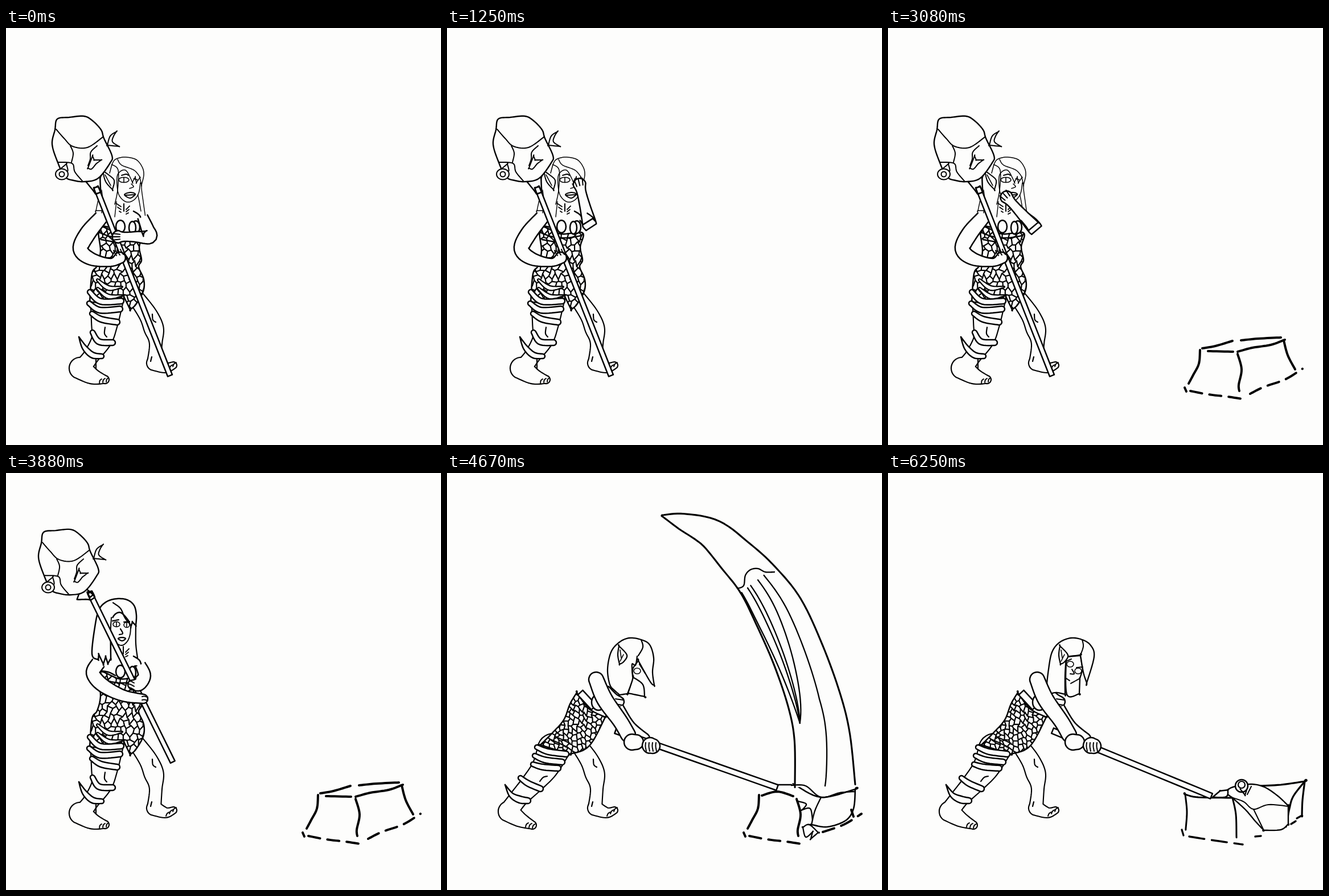
An HTML page with a canvas that plays this animation: 764 px wide and 733 px high, repeating every 6.71 s.

```html
<!DOCTYPE html>
<html lang="en">
<head>
<meta charset="utf-8">
<title>Club swing</title>
<style>
html, body { margin: 0; width: 100%; height: 100%; overflow: hidden; background: #fdfdfc; }
canvas { display: block; }
</style>
</head>
<body>
<canvas id="stage" width="764" height="733"></canvas>
<script>
const ctx = document.getElementById('stage').getContext('2d');
const PAPER = '#fdfdfc', LOOP = 6710, BODY = 2.5, THIN = 1.6;
const clamp = v => Math.max(0, Math.min(1, v));
const span = (t, a, b) => clamp((t - a) / (b - a));
const ease = u => u * u * (3 - 2 * u);
const lerp = (a, b, u) => a + (b - a) * u;
const mix = (p, q, u) => p.map((v, i) => lerp(v, q[i], u));
const add = (p, q) => p.map((v, i) => v + q[i]);
const polar = ([x, y], r, a) => [x + r * Math.cos(a), y + r * Math.sin(a)];
const noise = n => { const s = Math.sin(n * 127.1) * 43758.5453; return s - Math.floor(s) - 0.5; };

// "x,y x,y": smooth line through key points; "!" marks a corner, "z" closes it.
const keysOf = text => text.split(' ').flatMap(k => {
  const point = k.split(',').map(parseFloat);
  return k.includes('!') ? [point, point] : [point];
});

function spline(keys, u, closed) {
  const n = keys.length, i = Math.min(Math.floor(u), closed ? n - 1 : n - 2), f = u - i;
  const at = k => closed ? keys[(k + n) % n] : keys[Math.max(0, Math.min(n - 1, k))];
  const [a, b, c, d] = [at(i - 1), at(i), at(i + 1), at(i + 2)];
  return b.map((v, k) => v + f * ((c[k] - a[k]) / 2
    + f * (a[k] - 2.5 * v + 2 * c[k] - d[k] / 2 + f * (1.5 * (v - c[k]) + (d[k] - a[k]) / 2))));
}

function sampled(keys, closed, from = 0, to = closed ? keys.length : keys.length - 1) {
  const steps = Math.ceil((to - from) * 8);
  return Array.from({ length: steps + 1 }, (_, i) => spline(keys, lerp(from, to, i / steps), closed));
}

function trace(points, closed) {
  const path = new Path2D();
  points.forEach(p => path.lineTo(p[0], p[1]));
  if (closed) path.closePath();
  return path;
}

const cache = new Map();
function shape(text) {
  const closed = text.endsWith('z');
  if (!cache.has(text)) cache.set(text, trace(sampled(keysOf(text), closed), closed));
  return cache.get(text);
}

function paint(width, path, fill = true) {
  if (fill) { ctx.fillStyle = PAPER; ctx.fill(path); }
  ctx.lineWidth = width;
  ctx.stroke(path);
}
const ink = (width, ...lines) => lines.forEach(l => paint(width, shape(l), false));
const solid = (width, ...lines) => lines.forEach(l => paint(width, shape(l)));

function oval(width, x, y, rx, ry = rx) {
  const path = new Path2D();
  path.ellipse(x, y, rx, ry, 0, 0, Math.PI * 2);
  paint(width, path);
}

function ribs(spine) {
  const points = sampled(spine);
  return points.map((p, i) => {
    const a = points[Math.max(0, i - 1)], b = points[Math.min(points.length - 1, i + 1)];
    return { p, r: p[2], angle: Math.atan2(b[1] - a[1], b[0] - a[0]) };
  });
}
const side = ({ p, r, angle }, f) => polar(p, r * f, angle + Math.PI / 2);

// Outline around a spine of "x,y,radius" keys. Ends: open start, round or flat.
function limb(spine, ends = 'open') {
  const bones = ribs(typeof spine === 'string' ? keysOf(spine) : spine);
  const path = new Path2D(), half = Math.PI / 2;
  const cap = ({ p, r, angle }, turn) =>
    path.arc(p[0], p[1], Math.max(r, 0.1), angle + turn - half, angle + turn + half);
  bones.forEach(b => path.lineTo(...side(b, -1)));
  if (ends !== 'flat') cap(bones[bones.length - 1], 0);
  bones.reverse().forEach(b => path.lineTo(...side(b, 1)));
  if (ends === 'round') cap(bones[bones.length - 1], Math.PI);
  if (ends !== 'open') path.closePath();
  return path;
}

// Several limbs sharing one outer line.
function fuse(width, ...limbs) {
  const paths = limbs.map(l => limb(l, 'round'));
  ctx.lineWidth = width * 1.7;
  paths.forEach(p => ctx.stroke(p));
  ctx.fillStyle = PAPER;
  paths.forEach(p => ctx.fill(p));
}

function band(x0, y0, x1, y1, sag, r = 5) {
  paint(BODY, limb([[x0, y0, r - 1], [lerp(x0, x1, 0.4) - sag / 3, lerp(y0, y1, 0.4) + sag, r], [x1, y1, r]], 'round'));
}

// Short parallel lines for toes and fingers.
function digits(x, y, dx, dy, stepX, stepY, count) {
  for (let i = 0; i < count; i++) {
    const px = x + i * stepX, py = y + i * stepY;
    ink(2, `${px},${py} ${px + dx / 2 - 1},${py + dy / 2 - 1} ${px + dx},${py + dy}`);
  }
}

// Honeycomb of shaken corners inside an outline.
function scales(outline, [x0, y0, x1, y1], step, turn = 0) {
  solid(BODY, outline);
  ctx.save();
  ctx.clip(shape(outline));
  ctx.translate((x0 + x1) / 2, (y0 + y1) / 2);
  ctx.rotate(turn);
  const cols = Math.ceil((x1 - x0) / step * 1.4), rows = Math.ceil((y1 - y0) / step * 0.8);
  const corner = (i, j) => {
    const seed = i * 17.3 + j * 5.7;
    return [i * step / 2 + noise(seed) * step * 0.5,
      j * step + ((i + j) & 1 ? step * 0.45 : 0) + noise(seed + 0.4) * step * 0.6];
  };
  const path = new Path2D();
  for (let j = -rows; j < rows; j++) {
    for (let i = -cols; i < cols; i++) {
      path.moveTo(...corner(i, j));
      path.lineTo(...corner(i + 1, j));
      if ((i + j) & 1) {
        path.moveTo(...corner(i, j));
        path.lineTo(...corner(i, j + 1));
      }
    }
  }
  paint(2.2, path, false);
  ctx.restore();
}

function frontLeg() {
  fuse(BODY, '230,476,13 250,505,15 260,530,16 263,555,10 260,588,11', '260,589,12 280,597,8 294,593,5');
  ink(2.2, '257,503 258,513 263,517', '256,578 254,586');
  digits(281, 603, 6, -7, 6, -4, 3);
}

function standingBody() {
  frontLeg();
  fuse(BODY, '177,478,28 173,520,22 168,548,17 150,576,13 138,592,14', '130,598,18 152,612,13 174,618,6');
  digits(164, 624, 4, -7, 6, -1, 3);
  ink(2.2, '174,526 173,537 177,543', '158,583 158,599');
  scales('164,350 200,362 238,360 234,385 238,408 233,420 242,442 241,463 228,486 218,495! 207,472! 200,482 147,482! 151,432 160,418 166,392z', [148, 350, 246, 496], 11);
  for (const y of [443, 458]) paint(2.2, limb([[161, y, 2], [180, y + 14, 4], [204, y + 12, 1]], 'round'));
  band(147, 464, 202, 480, 10);
  band(146, 484, 200, 494, 8);
  band(151, 502, 195, 517, 4);
  band(152, 535, 187, 553, 9);
  paint(BODY, limb('128,543,0 138,562,4 152,575,5 168,577,4', 'round'));
}

function neckMarks(x, y) {
  ink(2, `${x},${y} ${x},${y + 13}`);
  for (let i = 0; i < 3; i++) {
    ink(1.8, `${x - 14 + i * 3},${y + i * 7 - 1} ${x - 5},${y + 5 + i * 5}`,
      `${x + 4},${y + 10 + i * 4} ${x + 10 - i},${y + 4 + i * 6}`);
  }
}

function chest() {
  ink(BODY, '162,347 180,350 192,356', '163,359 185,367 210,369 236,365', '167,372 190,376', '224,322 235,330 239,345');
  oval(BODY, 201, 349, 8, 11);
  oval(BODY, 228, 350, 7, 11);
  oval(BODY, 222, 351, 6, 11);
}

function eye(x, y, rx) {
  oval(THIN, x, y, rx, 4.5);
  ink(THIN, `${x},${y - 4} ${x},${y + 4}`);
}

function standingHead() {
  ink(1.4, '170,254 164,270 164,290 158,321! 168,321', '168,285 170,305 168,325',
    '240,262 238,280 241,305 245,333! 238,335', '231,290 234,305 237,322', '194,305 191,332');
  solid(1.5, '186,240 192,231 208,227 228,231 239,244 242,258 238,276! 235,263! 229,272! 227,262! 222,271! 210,250 196,258 196,285 202,299 213,306 225,302 233,290 236,272');
  ink(1.5, '186,240 182,255', '196,231 203,241 225,250 236,263', '186,240 197,250 196,285 191,310',
    '220,274 224,279 217,282', '224,265 231,267');
  eye(207, 267, 9);
  ink(2, '203,259 211,257 215,259', '208,293 218,289 227,292 218,299z', '209,294 227,293');
  solid(2, '170,251! 175,270 187,284! 190,268 180,258z');
  ink(THIN, '174,258 184,277');
  neckMarks(207, 309);
}

function grippingHead() {
  solid(BODY, '184,326! 179,335! 175,323! 171,336! 163,319! 162,328! 151,318 157,265 164,239 177,226 195,221 213,223 225,233 229,250 228,268! 222,262! 219,271! 214,258 200,245 187,255 184,285z');
  solid(1.9, '185,254 184,285 191,297 203,303 213,296 218,283 219,268');
  ink(2.2, '188,228 201,238 208,253 215,263', '228,266 228,300 231,325', '187,260 198,258', '207,262 217,261',
    '201,274 205,282 199,284', '197,291 204,289 210,291 204,295z');
  eye(194, 266, 6);
  eye(212, 267, 5);
  neckMarks(206, 305);
}

// The head keeps its shape; the handle runs from under it to the given end.
function club(head, neck, end) {
  const joint = add(head, neck);
  paint(BODY, limb([[...add(head, [20, 54]), 13], [...joint, 5], [...mix(joint, end, 0.05), 4.3], [...end, 4.3]], 'flat'));
  ctx.save();
  ctx.translate(...head);
  solid(2.4, '-43,-52 -22,-55 4,-57 19,-49 34,-33 39,-18 53,12 50,25 29,52 6,58 -14,56 -30,49 -43,22 -52,-8 -47,-33z');
  ink(2, '-45,-34 -31,-18 -16,-4 10,-2 38,-21', '-20,-5 -15,8 -18,24', '-41,24 -17,26 -12,41 2,58', '27,-5 16,6 15,18 11,30');
  solid(2, '11,34! 19,13! 22,20! 34,20! 25,27! 17,36z', '45,-6! 50,-22 61,-30! 56,-22 54,-12 65,-4! 54,-5z', '-39,37! -27,27! -25,40z');
  oval(2, -35, 45, 11, 9.5);
  oval(2, -35, 45, 4.5);
  ctx.restore();
}

// Elbow point, then forearm length and angle in degrees.
const ARM = { crossed: [252, 367, 56, 180], face: [250, 344, 73, 256], raised: [262, 338, 92, 270] };

function freeArm(t) {
  const gesture = t < 1460 ? mix(ARM.crossed, ARM.face, ease(span(t, 640, 1080)))
    : mix(mix(ARM.face, ARM.raised, ease(span(t, 1460, 1900))), ARM.crossed, ease(span(t, 2880, 3300)));
  const [x, y, length, degrees] = gesture, angle = degrees * Math.PI / 180;
  const reach = (u, r) => [...polar([x, y], length * u, angle), r];
  paint(BODY, limb([[240, 332, 9], [lerp(240, x, 0.7), lerp(332, y, 0.6), 11], [x, y, 12],
    reach(0.45, 9), reach(0.8, 8), reach(0.97, 11)]));
  for (let i = -1; i < 2; i++) {
    const from = polar([x, y], length + 8, angle + i * 0.09), to = polar([x, y], length - 4, angle + i * 0.08);
    paint(2, trace([from, to]), false);
  }
}

function lowerArm() {
  paint(BODY, limb('167,333,12 143,362,14 131,389,13 150,406,11 184,412,7 200,404,10'));
  digits(189, 391, 5, 9, 6, -1, 3);
}

function grippingArms() {
  paint(BODY, limb('236,337,9 243,356,11 233,371,12 222,372,8'));
  paint(BODY, limb('162,334,12 153,352,12 170,373,12 205,391,10 241,397,8'));
  digits(216, 365, 9, 4, 0, 6, 3);
  digits(239, 393, 10, 1, 0, 6, 2);
}

function standing(t) {
  const gripping = t >= 3440, lift = span(t, 3410, 4000);
  standingBody();
  chest();
  gripping ? grippingHead() : standingHead();
  club(mix([133, 212], [103, 142], lift), mix([29, 78], [45, 59], lift), mix([288, 611], [294, 482], lift));
  if (gripping) return grippingArms();
  lowerArm();
  freeArm(t);
}

function lungeHead(straining) {
  if (straining) {
    solid(2.3, '327,359! 318,387! 347,393! 344,372z',
      '341,293 356,302 363,325 361,350 364,373! 357,367 336,330! 326,345 326,362 317,388! 303,390! 294,382! 286,372 282,345 288,315 302,298 320,290z');
    ink(2.2, '341,293 344,306 336,321', '334,322 331,338 325,336 326,358', '338,336 348,352');
  } else {
    solid(2.3, '313,323! 338,321! 342,345! 337,361! 336,388! 314,389z',
      '285,388! 279,378 282,345 288,315 301,298 321,290 341,293 356,303 362,323 349,369! 343,350 338,320! 313,323! 311,355 311,389! 296,386z');
    ink(2, '341,293 343,305 338,320', '313,331 322,327', '331,342 342,341', '323,345 327,353 320,353', '313,361 319,365', '321,370 337,361');
    oval(THIN, 320, 336, 6, 5);
  }
  oval(THIN, 334, 348, 6, 5);
  solid(2.2, '302,304! 300,320 303,336! 310,332 316,320z');
  ink(THIN, '304,311 306,325', '310,319 304,331');
}

function lungeBody() {
  frontLeg();
  fuse(BODY, '187,486,27 172,518,22 150,545,18 127,570,15 113,588,15', '108,595,17 128,609,12 150,619,6');
  digits(138, 622, 5, -7, 6, 1, 3);
  ink(2.2, '163,542 169,535 176,533');
  scales('228,386! 245,410 258,420 278,429! 257,470 240,487 215,494! 164,478! 184,458 205,434 216,406z', [162, 386, 284, 494], 9, -0.4);
  band(158, 482, 209, 494, 3);
  band(154, 497, 202, 508, 3);
  band(151, 512, 195, 519, 2);
  band(129, 536, 164, 555, 2);
  paint(BODY, limb('102,548,0 113,566,4 128,574,6 142,576,5', 'round'));
  ink(2.2, '181,468 197,475 212,482', '190,463 205,470 216,475');
}

function lungeArms() {
  paint(BODY, limb('234,386,6 258,412,6', 'flat'));
  oval(BODY, 266, 403, 12, 14);
  paint(BODY, limb('281,382,7 292,396,9 302,402,9', 'round'));
  ink(2, '296,397 309,399', '296,406 307,408');
  paint(BODY, limb('302,412,8 322,444,8 348,466,8'));
}

function lungeHands() {
  paint(BODY, limb('262,363,13 277,398,14 304,436,13 318,460,13', 'round'));
  paint(BODY, limb('325,473,14 332,473,13', 'round'));
  paint(BODY, limb('357,479,14 361,480,13', 'round'));
  digits(349, 474, 1, 15, 6, 0, 4);
}

function dashed(width, dash, ...lines) {
  ctx.setLineDash(dash);
  ink(width, ...lines);
  ctx.setLineDash([]);
}

const BLOCK_FRONT = ['548,566 546,590 536,610 528,625', '614,573 621,600 616,627 617,638', '521,632 524,639'];
const BLOCK_TOP = ['552,563 575,559 605,550', '620,549 650,546 690,544', '562,568 606,569',
  '614,569 640,562 672,557 697,548', '695,549 702,575 715,600'];
const NEAR_EDGE = '531,638 562,644 596,648 622,652', FAR_EDGE = '636,643 660,631 697,618 728,599';

function block(u) {
  const lines = [...BLOCK_TOP, ...BLOCK_FRONT];
  ink(4, ...lines.slice(0, Math.ceil(lines.length * u)));
  if (u === 1) dashed(4, [21, 13], NEAR_EDGE, FAR_EDGE);
}

const HORN = keysOf('378,75,1 412,85,14 465,107,26 508,147,33 546,188,38 582,243,45 617,320,46 645,400,47 659,465,49 664,550,53');

// Streaks follow the horn, sliding sideways from one fraction of its width to another.
function streak(from, to, f0, f1) {
  const bones = ribs(HORN).slice(from * 8, to * 8 + 1);
  paint(2.3, trace(bones.map((b, i) => side(b, -lerp(f0, f1, (i / (bones.length - 1)) ** 2)))), false);
}

function smear() {
  solid(2.6, '611,548! 657,570 717,556! 714,590 700,611 668,622 640,618!');
  paint(3.1, limb([...HORN].reverse()));
  ink(2.3, '510,203 521,198 524,180 533,170 546,168 559,174 575,174', '657,570 646,594 640,619',
    '605,549 630,550 657,570 690,562 716,560', '582,548 605,548');
  for (const f of [-0.95, -0.6, -0.42, 0]) streak(4, 7.6, f, -0.72);
  streak(4, 7, 0.35, 0.2);
  streak(7, 9, 0.2, 0);
  ink(2.3, '617,577! 631,582 624,592! 638,590 642,610');
  solid(2.3, '625,623! 636,618 652,632! 639,643! 642,631! 630,640z');
  ink(4, '553,567 580,560 608,568', ...BLOCK_FRONT, '710,592 714,604');
  dashed(4, [21, 13], NEAR_EDGE, '660,631 697,618 728,599');
}

function brokenBlock() {
  solid(3, '523,625! 525,595 522,565! 545,570 605,571! 611,600 612,638!');
  ink(3.2, '650,550 690,548 732,542! 728,575 727,602! 718,607', '732,542 712,568 705,590 699,622', '516,627 519,637');
  dashed(3.4, [27, 13], '529,639 567,645 623,653');
  ink(3.4, '645,639 655,638', '708,617 716,612');
  solid(2.4, '605,571! 628,592 645,612 660,628! 690,627 703,617! 703,585! 685,568 661,552 636,547 606,552 594,561z');
  ink(2, '606,571 625,578 642,591 668,583 704,586', '642,591 660,628', '631,565 638,551');
  solid(BODY, '570,570! 583,559! 597,557! 594,569z');
  oval(BODY, 621, 550, 11);
  oval(2.2, 621, 548, 6);
  ink(2.2, '619,556! 627,566! 630,557');
}

function placed([x, y], scale, draw) {
  ctx.save();
  ctx.translate(x, y);
  ctx.scale(scale, scale);
  draw();
  ctx.restore();
}

const flight = (t, apexTime, apexY) => apexY + 0.00085 * (t - apexTime) ** 2;

function boulder() {
  const rim = Array.from({ length: 72 }, (_, i) => {
    const a = i * Math.PI / 36, c = Math.cos(a), s = Math.sin(a);
    const ripple = s > 0.5 ? 3 * Math.cos(a * 9) : 0;
    return [68 * Math.sign(c) * Math.abs(c) ** 0.65, 74 * Math.sign(s) * Math.abs(s) ** 0.7 + ripple];
  });
  paint(3.6, trace(rim, true));
}

function debris(t) {
  if (t > 4790 && t < 6230) {
    const size = span(t, 4740, 5000) * lerp(1, 0.3, span(t, 5650, 6230));
    placed([611, flight(t, 5500, 216)], size, boulder);
  }
  if (t > 4740 && t < 5950) placed([608, flight(t, 5254, 74)], 1, () => solid(4.8, '-6,16! -5,-6 0,-19 5,-10 6,12 1,18z'));
  if (t > 4720 && t < 5200) {
    const u = (t - 4720) / 410;
    placed(mix([600, 560], [0, 446], u), 1, () => solid(4, '3,-15! 35,-5! -4,15! 4,-8z'));
    placed(mix([640, 570], [131, 603], u), 1, () => ink(2, '-14,12! 14,-13! -10,-13! 15,3! -13,5! 4,-8! -2,14'));
  }
}

function leaf(t) {
  if (t < 1950 || t > 2680) return;
  const u = ease(span(t, 2400, 2680));
  const y = lerp(lerp(234, 190, span(t, 1950, 2420)), 590, u * u);
  placed([lerp(265, 620, u), y], 1, () => ink(1.8, '-9,-7! -3,-3 0,9! 8,1 9,-7! 2,-2 0,9! -8,2z', '-4,-4 0,-7 4,-4'));
}

function swingingClub(t) {
  ctx.save();
  ctx.translate(345, 478);
  ctx.rotate(lerp(0.1, 2.2, span(t, 4400, 4560) ** 1.5));
  ctx.translate(-238, -460);
  club([133, 212], [29, 78], [258, 540]);
  ctx.restore();
}

function lunging(t, impact, broken) {
  lungeBody();
  lungeArms();
  lungeHead(!broken);
  if (!impact) swingingClub(t);
  else paint(BODY, limb(broken ? '289,453,5 568,568,5' : '296,453,5 580,553,5', 'flat'));
  lungeHands();
}

function draw(t) {
  const impact = t >= 4560, broken = t >= 4720;
  ctx.fillStyle = PAPER;
  ctx.fillRect(0, 0, 764, 733);
  ctx.strokeStyle = '#000';
  ctx.lineCap = ctx.lineJoin = 'round';
  if (broken) {
    debris(t);
    brokenBlock();
  } else if (impact) smear();
  else block(span(t, 2640, 2820));
  if (t >= 4400) return lunging(t, impact, broken);
  standing(t);
  leaf(t);
}

const start = performance.now();
function tick() {
  draw((performance.now() - start) % LOOP);
  requestAnimationFrame(tick);
}
tick();
</script>
</body>
</html>
```
